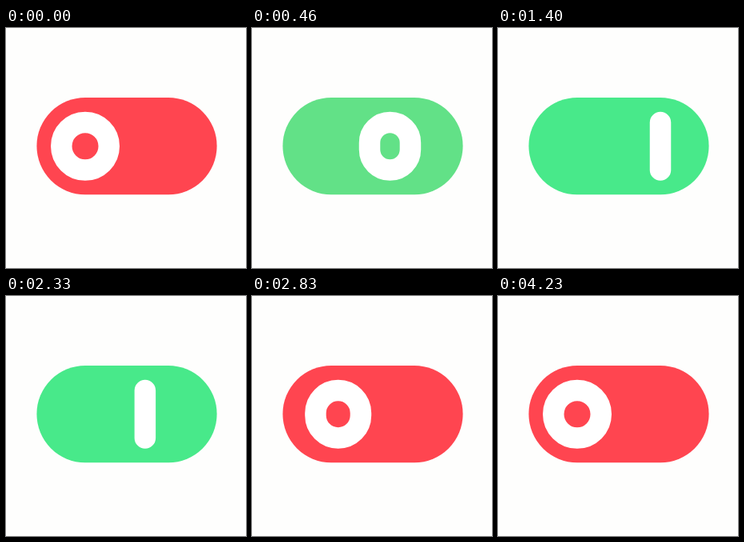
Write an HTML page that moves like this. It is 300 by 300 pixels and loops after 4.26 s.

```html
<!DOCTYPE html>
<html lang="en">
<head>
<meta charset="utf-8">
<title>Toggle</title>
<style>
  html, body { margin: 0; width: 100%; height: 100%; overflow: hidden; background: #fefefd; }
  svg { display: block; width: 100vw; height: 100vh; }
</style>
</head>
<body>
<svg viewBox="0 0 300 300">
  <rect id="track" x="38.4" y="86.9" width="225.2" height="121.4" rx="60.7"/>
  <rect id="knob" y="118" height="59.5" stroke="#fff" stroke-width="26.5" stroke-linejoin="round"/>
</svg>
<script>
const LOOP = 4260, ON_AT = 228, OFF_AT = 2300;
const RED = [255, 69, 80], GREEN = [72, 233, 138];
const OFF_X = 99, ON_X = 203, RING = 59.5, STROKE = 26.5;

const track = document.getElementById('track');
const knob = document.getElementById('knob');
const mix = (a, b, p) => a + (b - a) * p;
const clamp = v => Math.min(1, Math.max(0, v));

function smooth(t, from, to) {
  const u = clamp((t - from) / (to - from));
  return u * u * (3 - 2 * u);
}

function bezier(x1, y1, x2, y2) {
  const axis = (a, b, s) => 3 * s * (1 - s) ** 2 * a + 3 * s * s * (1 - s) * b + s ** 3;
  return x => {
    let lo = 0, hi = 1;
    for (let i = 0; i < 24; i++) {
      const mid = (lo + hi) / 2;
      if (axis(x1, x2, mid) < x) lo = mid; else hi = mid;
    }
    return axis(y1, y2, hi);
  };
}

// Progress of each part, t ms after the toggle
const glide = bezier(.02, .8, .53, 1);
const slide = t => t <= 0 ? 0 : glide(clamp(t / 1000));
const tint = t => smooth(t, 42, 271);
// The ring closes almost fully, then settles late
const morph = t => .95 * smooth(t, 147, 497) + .05 * smooth(t, 900, 1170);

// Channels blend by their squares, which keeps the middle tones bright
const blend = p => RED.map((c, i) => Math.round(Math.sqrt(mix(c * c, GREEN[i] ** 2, p))));

function draw(t) {
  const at = part => t < OFF_AT ? part(t - ON_AT) : 1 - part(t - OFF_AT);
  const w = Math.max(.01, RING * (1 - at(morph)));
  const color = `rgb(${blend(at(tint))})`;
  track.setAttribute('fill', color);
  knob.setAttribute('fill', w > STROKE ? color : '#fff');
  knob.setAttribute('x', mix(OFF_X, ON_X, at(slide)) - w / 2);
  knob.setAttribute('width', w);
  knob.setAttribute('rx', w / 2);
  knob.setAttribute('ry', w / 2);
}

const start = performance.now();
function frame() {
  draw((performance.now() - start) % LOOP);
  requestAnimationFrame(frame);
}
draw(0);
requestAnimationFrame(frame);
</script>
</body>
</html>
```
